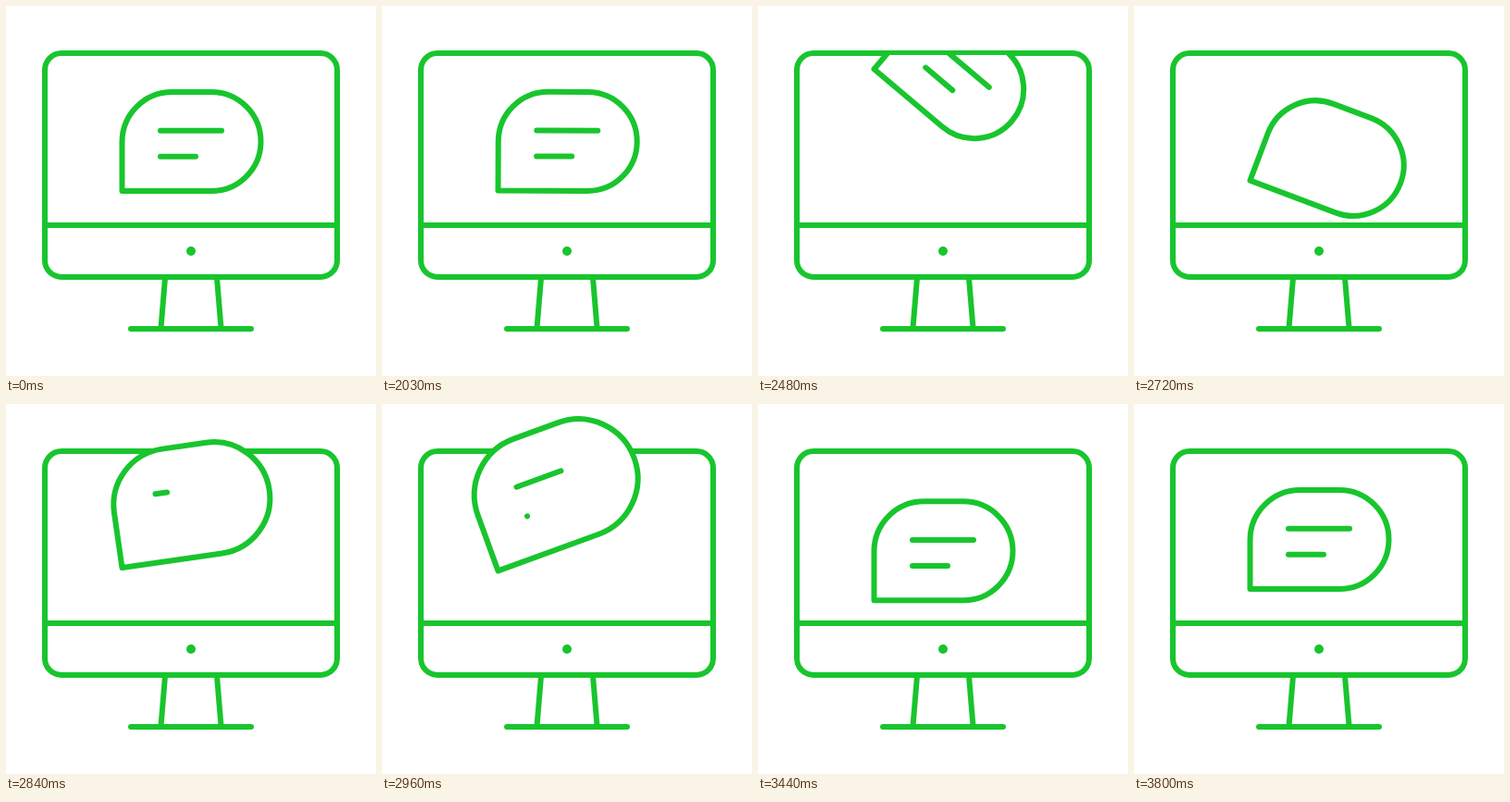
Animation, 400 px wide and 400 px high, one loop 3830 ms. Source, as an HTML page:

```html
<!DOCTYPE html>
<html lang="en">
<head>
<meta charset="utf-8">
<title>Message on a monitor</title>
<style>
  html, body { margin: 0; width: 100%; height: 100%; overflow: hidden; background: #fff; }
  svg { display: block; width: 100%; height: 100%; }
  path, line, rect.frame {
    fill: none; stroke: #18c52d; stroke-width: 6;
    stroke-linecap: round; stroke-linejoin: round;
  }
  #bubble * { vector-effect: non-scaling-stroke; }
  #bubble path { fill: #fff; }
</style>
</head>
<body>
<svg viewBox="0 0 400 400">
  <clipPath id="window"><rect id="clip" width="400"/></clipPath>
  <rect class="frame" x="42" y="51" width="316" height="242" rx="18"/>
  <path d="M42 237H358M172 294L167.5 348M228 294L232.5 348M135 349H265"/>
  <circle cx="200" cy="265" r="5" fill="#18c52d"/>
  <g clip-path="url(#window)">
    <g id="bubble">
      <path d="M0 0V-53A54 54 0 0 1 54 -107H96.5A53.5 53.5 0 0 1 96.5 0Z"/>
      <line id="long" x1="41.5" y1="-65.3" y2="-65.3"/>
      <line id="short" x1="41.5" y1="-37.3" y2="-37.3"/>
    </g>
  </g>
</svg>
<script>
const LOOP = 3830, LEAVE = 1950, ENTER = 2595;
const byId = id => document.getElementById(id);
const bubble = byId('bubble'), clip = byId('clip');
const longLine = byId('long'), shortLine = byId('short');

const progress = (t, from, to) => Math.min(1, Math.max(0, (t - from) / (to - from)));
const smooth = (t, from, to) => {
  const u = progress(t, from, to);
  return u * u * (3 - 2 * u);
};
const remaining = (t, from, to, power) => (1 - progress(t, from, to)) ** power;

// Tilts while it accelerates out through the top of the screen.
function leaving(t) {
  const u = Math.max(0, (t - LEAVE) / 530);
  return { y: 200 - 131 * u ** 3, angle: 40 * u ** 2.7, scale: 1, long: 1, short: 1, top: 53, bottom: 234 };
}

// Shoots up from below, swells past the frame, then drops and settles.
function entering(t) {
  const rise = 143 * remaining(t, ENTER, 2890, 4.5);
  const angle = t < 2960
    ? -20 + 86 * remaining(t, ENTER, 2960, 1.77)
    : -20 * (1 - smooth(t, 2960, 3226));
  return {
    y: 177 + rise + 39 * smooth(t, 2890, 3280) - 16 * smooth(t, 3280, 3800),
    angle,
    scale: 1 + 0.2 * (smooth(t, 2660, 2960) - smooth(t, 2960, 3278)),
    long: smooth(t, 2746, 3106),
    short: smooth(t, 2950, 3350),
    top: 0,
    bottom: 285
  };
}

function drawLine(line, length, amount) {
  line.setAttribute('x2', 41.5 + length * amount);
  line.style.display = amount > 0 ? '' : 'none';
}

function render(t) {
  const pose = t < ENTER ? leaving(t) : entering(t);
  bubble.setAttribute('transform',
    `translate(125.5 ${pose.y}) rotate(${pose.angle}) scale(${pose.scale})`);
  clip.setAttribute('y', pose.top);
  clip.setAttribute('height', pose.bottom - pose.top);
  drawLine(longLine, 66, pose.long);
  drawLine(shortLine, 38, pose.short);
}

const start = performance.now();
function tick() {
  render((performance.now() - start) % LOOP);
  requestAnimationFrame(tick);
}
tick();
</script>
</body>
</html>
```
